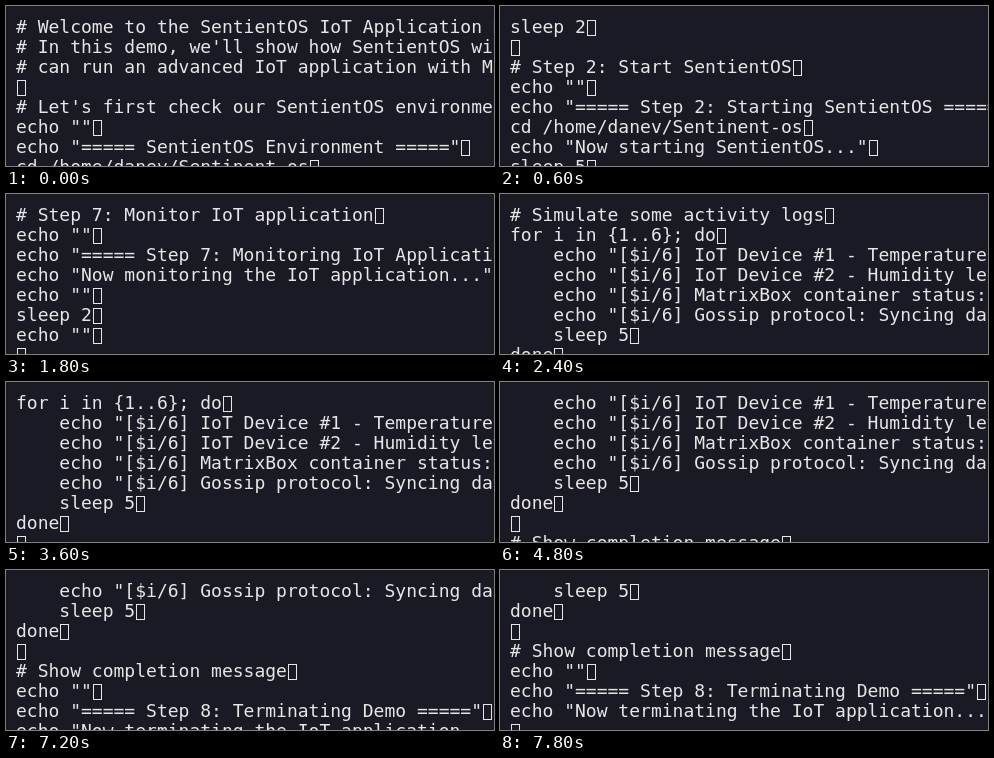
An HTML page for the animation above (8 s loop, 488 px wide and 160 px high).

```html
<!DOCTYPE html>
<html lang="en">
<head>
<meta charset="utf-8">
<title>Terminal demo</title>
<style>
html, body {
  margin: 0;
  width: 100%;
  height: 100%;
  overflow: hidden;
  background: #1a1a24;
}
.view {
  position: absolute;
  inset: 0;
  overflow: hidden;
  clip-path: inset(12px 0 0 0);
}
.script {
  position: absolute;
  left: 10px;
  top: 10px;
  color: #e6e6e6;
  font: 18px/21px "DejaVu Sans Mono", monospace;
  font-variant-ligatures: none;
  animation: scroll 8s step-end infinite;
}
p {
  margin: 0;
  height: 20px;
  white-space: pre;
}
/* missing-glyph box that ends every line */
p::after {
  content: "";
  display: inline-block;
  box-sizing: border-box;
  width: 9px;
  height: 16px;
  margin-left: 1px;
  border: 1px solid;
  vertical-align: -3px;
}
@keyframes scroll {
  0% { transform: translateY(0); }
  7.5% { transform: translateY(-160px); }
  15% { transform: translateY(-320px); }
  22.5% { transform: translateY(-480px); }
  30% { transform: translateY(-640px); }
  45% { transform: translateY(-660px); }
  60% { transform: translateY(-680px); }
  67.5% { transform: translateY(-700px); }
  75% { transform: translateY(-720px); }
  90% { transform: translateY(-740px); }
  97.5%, 100% { transform: translateY(-760px); }
}
</style>
</head>
<body>
<div class="view">
<div class="script">
<p># Welcome to the SentientOS IoT Application Demo</p>
<p># In this demo, we'll show how SentientOS with</p>
<p># can run an advanced IoT application with MatrixBox</p>
<p></p>
<p># Let's first check our SentientOS environment</p>
<p>echo ""</p>
<p>echo "===== SentientOS Environment ====="</p>
<p>cd /home/danev/Sentinent-os</p>

<p>sleep 2</p>
<p></p>
<p># Step 2: Start SentientOS</p>
<p>echo ""</p>
<p>echo "===== Step 2: Starting SentientOS ====="</p>
<p>cd /home/danev/Sentinent-os</p>
<p>echo "Now starting SentientOS..."</p>
<p>sleep 5</p>

<p>echo "SentientOS is now running!"</p>
<p>echo ""</p>
<p>sleep 2</p>
<p></p>
<p># Step 3: Verify ZK contract</p>
<p>echo ""</p>
<p>echo "===== Step 3: Verifying ZK Contract ====="</p>
<p>cd /home/danev/Sentinent-os/tsc_burn_output</p>

<p># Step 7: Monitor IoT application</p>
<p>echo ""</p>
<p>echo "===== Step 7: Monitoring IoT Application ====="</p>
<p>echo "Now monitoring the IoT application..."</p>
<p>echo ""</p>
<p>sleep 2</p>
<p>echo ""</p>
<p></p>

<p># Simulate some activity logs</p>
<p>for i in {1..6}; do</p>
<p>    echo "[$i/6] IoT Device #1 - Temperature: 24C"</p>
<p>    echo "[$i/6] IoT Device #2 - Humidity level: 45%"</p>
<p>    echo "[$i/6] MatrixBox container status: Running"</p>
<p>    echo "[$i/6] Gossip protocol: Syncing data"</p>
<p>    sleep 5</p>
<p>done</p>
<p></p>
<p># Show completion message</p>
<p>echo ""</p>
<p>echo "===== Step 8: Terminating Demo ====="</p>
<p>echo "Now terminating the IoT application..."</p>
<p></p>
</div>
</div>
</body>
</html>
```
